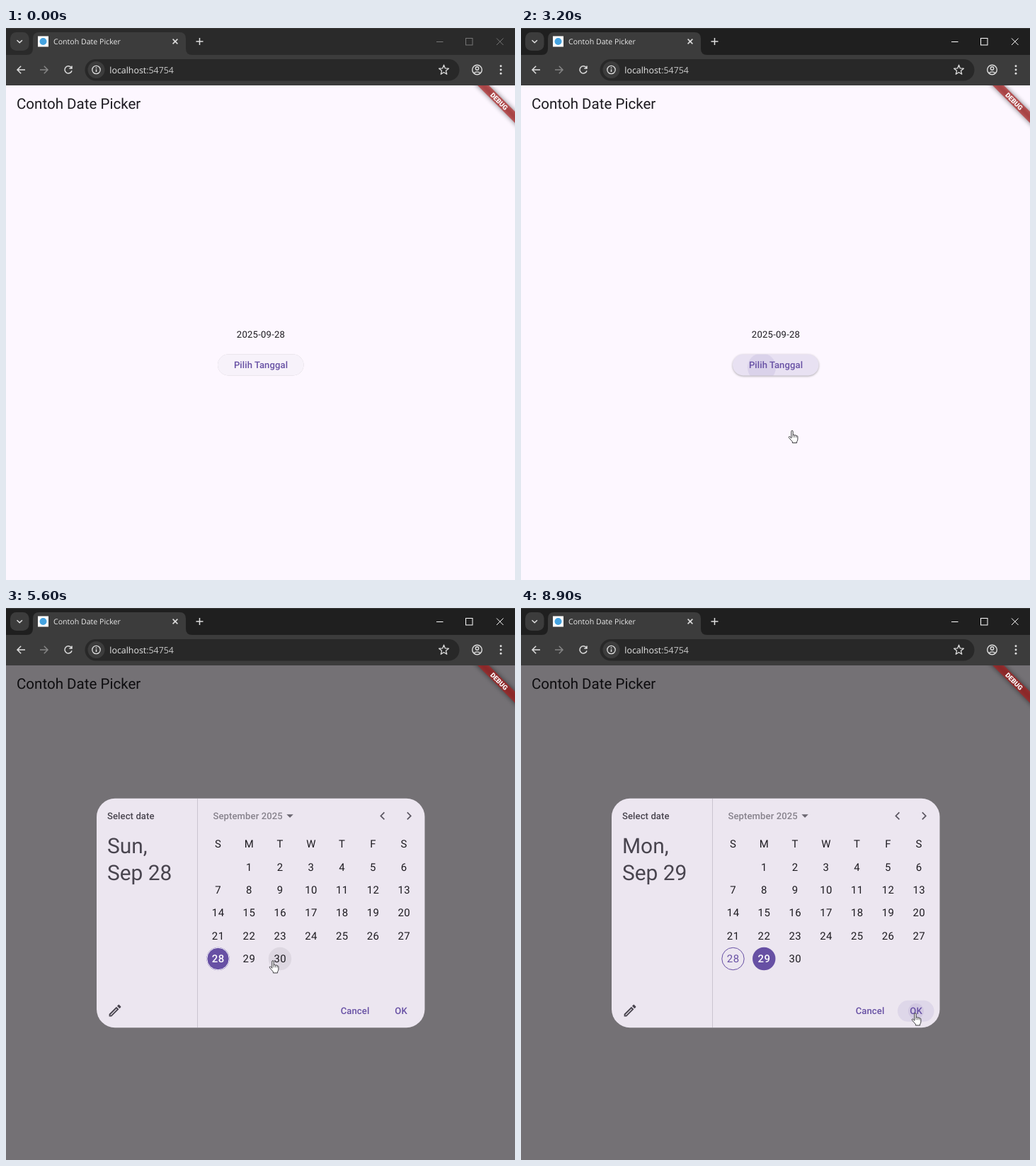
Animation of 719 by 779 pixels, one loop 9000 ms. Source, as an HTML page:

```html
<!DOCTYPE html>
<html lang="id">
<head>
<meta charset="utf-8">
<title>Contoh Date Picker</title>
<style>
  html, body { margin: 0; width: 100%; height: 100%; overflow: hidden; background: #fdf7ff; }
  svg { display: block; width: 719px; height: 779px; }
  text { font-family: Roboto, sans-serif; fill: #1d1b20; text-rendering: geometricPrecision; }
  .ui { font-family: "Open Sans", "Noto Sans", sans-serif; fill: #e8e8e8; }
  .label { font-size: 13.08px; font-weight: 500; letter-spacing: .09px; }
  .primary { fill: #6750a4; }
  .muted { fill: #49454f; }
  .mid { text-anchor: middle; }
  .day { font-size: 14.94px; letter-spacing: .47px; text-anchor: middle; }
  .big { font-size: 29.9px; fill: #49454f; }
  .line { fill: none; stroke: #dedede; stroke-width: 1.5; }
</style>
</head>
<body>
<svg viewBox="0 0 719 779">
  <defs>
    <clipPath id="pageClip"><rect y="81" width="719" height="698"/></clipPath>
    <clipPath id="buttonClip"><rect x="299" y="460.5" width="121.5" height="30" rx="15"/></clipPath>
    <filter id="blur" x="-50%" y="-150%" width="200%" height="400%"><feGaussianBlur stdDeviation="3.5"/></filter>
  </defs>

  <!-- browser window -->
  <rect id="frame" width="719" height="40"/>
  <rect width="719" height="1" fill="#3a3a3a"/>
  <rect x="6" y="6" width="26.5" height="26" rx="8.5" fill="#3c3c3c"/>
  <path class="line" d="M15.5 17.2l3.7 3.6 3.7-3.6"/>
  <path d="M29 38q9 0 9-9V15q0-9 9-9H245q9 0 9 9V29q0 9 9 9Z" fill="#3c3c3c"/>
  <rect y="38" width="719" height="43" fill="#3c3c3c"/>
  <rect x="45" y="11.5" width="15" height="15" fill="#fff"/>
  <circle cx="52.5" cy="19" r="5" fill="#45a3e0"/>
  <text class="ui" x="67" y="23" font-size="10.6">Contoh Date Picker</text>
  <path class="line" d="M235.6 15.6l6.8 6.8m0-6.8l-6.8 6.8M268.5 19h10m-5-5v10"/>
  <g id="controls" fill="none" stroke-width="1">
    <path d="M608 19.5h9.5M693 14.5l9.5 9.5m0-9.5l-9.5 9.5"/>
    <rect x="649.5" y="14.5" width="9.5" height="9.5"/>
  </g>
  <path class="line" d="M27 59H16m5.2-5.2L16 59l5.2 5.2"/>
  <path class="line" d="M48 59h11m-5.2-5.2L59 59l-5.2 5.2" style="stroke:#858585"/>
  <path class="line" d="M92.3 56A5.1 5.1 0 1 0 93 60.2M93 53.4v3.6h-3.7"/>
  <rect x="111.5" y="44" width="529" height="30.5" rx="15.25" fill="#282828"/>
  <circle cx="127.5" cy="59" r="12" fill="#3c3c3c"/>
  <circle class="line" cx="127.5" cy="59" r="5.7" style="stroke-width:1.3"/>
  <path class="line" d="M127.5 58.2v3.8M127.5 55.6v1.4"/>
  <text class="ui" x="146.3" y="63.6" font-size="12.4">localhost<tspan fill="#c8c8c8">:54754</tspan></text>
  <path id="star" class="line" style="stroke-width:1.3" stroke-linejoin="round"/>
  <circle class="line" cx="665.5" cy="59" r="6.8" style="stroke-width:1.4"/>
  <circle class="line" cx="665.5" cy="57" r="2.2" style="stroke-width:1.4"/>
  <path class="line" d="M660.8 63.6q4.7-3.4 9.4 0" style="stroke-width:1.4"/>
  <g fill="#dedede">
    <circle cx="699" cy="53.8" r="1.45"/><circle cx="699" cy="59" r="1.45"/><circle cx="699" cy="64.2" r="1.45"/>
  </g>

  <!-- page -->
  <rect y="81" width="719" height="698" fill="#fdf7ff"/>
  <text x="15" y="114.3" font-size="20.55">Contoh Date Picker</text>
  <text class="mid" x="360" y="437.2" font-size="13.08" letter-spacing=".23">2025-09-28</text>
  <rect id="button" x="299" y="460.5" width="121.5" height="30" rx="15" fill="#f7f2fa"/>
  <g clip-path="url(#buttonClip)" fill="#6750a4">
    <rect id="buttonHover" x="299" y="460" width="122" height="31"/>
    <circle id="buttonRipple" cx="340" cy="479" r="20" opacity=".1"/>
  </g>
  <text class="label primary mid" x="360" y="480.4">Pilih Tanggal</text>

  <!-- dialog -->
  <g id="dialog">
    <rect y="81" width="719" height="698" opacity=".54"/>
    <rect x="128" y="268.8" width="463.5" height="323.4" rx="26" fill="#ece6f0"/>
    <path d="M270.5 269V592" stroke="#cac4d0"/>
    <text class="label muted" x="143" y="297.8">Select date</text>
    <text id="weekday" class="big" x="143" y="346.4"></text>
    <text id="date" class="big" x="143" y="383.8"></text>
    <path class="muted" transform="translate(142.8 557) scale(.934)" d="M14.06 9.02l.92.92L5.92 19H5v-.92l9.06-9.06M17.66 3c-.25 0-.51.1-.7.29l-1.83 1.83 3.75 3.75 1.83-1.83c.39-.39.39-1.02 0-1.41l-2.34-2.34c-.2-.2-.45-.29-.71-.29zm-3.6 3.19L3 17.25V21h3.75L17.81 9.94l-3.75-3.75z"/>
    <g opacity=".62">
      <text class="label muted" x="292.5" y="297.8">September 2025</text>
    </g>
    <path d="M396.4 291.2h9.4l-4.7 4.7z" fill="#6a6670"/>
    <path d="M534.4 288.4l-5 5 5 5M566.8 288.4l5 5-5 5" fill="none" stroke="#5a5661" stroke-width="1.7"/>
    <circle id="dayHover" cy="495" r="16.2" fill="#49454f" opacity=".09"/>
    <circle id="picked" cy="495" fill="#6750a4" r="16.2"/>
    <circle id="today" cx="299.5" cy="495" r="15.7" fill="none"/>
    <g id="days"></g>
    <rect id="okHover" x="532" y="553.8" width="51.5" height="30" rx="15" fill="#6750a4"/>
    <circle id="okRipple" cx="558" cy="569" r="11" fill="#6750a4" opacity=".1"/>
    <text class="label primary mid" x="493" y="573.2">Cancel</text>
    <text class="label primary mid" x="558" y="573.2">OK</text>
  </g>

  <!-- corner banner -->
  <g clip-path="url(#pageClip)">
    <g transform="translate(719 81) rotate(45)">
      <rect x="-60" y="26.1" width="120" height="11.3" opacity=".5" filter="url(#blur)"/>
      <rect x="-60" y="26.1" width="120" height="11.3" fill="#b71c1c" fill-opacity=".627"/>
      <text class="mid" y="35.2" font-size="9.5" font-weight="900" style="fill:#fff">DEBUG</text>
    </g>
  </g>

  <g id="cursor" fill="#fff" stroke="#26262a" stroke-width=".9" stroke-linejoin="round">
    <path id="arrow" d="M0 0V12.2L2.8 9.6 4.9 14 6.7 13.2 4.8 8.9H8.7Z"/>
    <g id="hand" transform="translate(-5.4 .3)">
      <path d="M4.2 11V1.6a1.2 1.2 0 0 1 2.4 0V7q.3-1 1.3-.8 1 .1 1.1 1.1.5-.7 1.4-.5.9.2 1 1 .7-.4 1.3 0 .6.3.6 1.3V12.5q0 2-1.3 3.5V17.7H5.8V16Q3.5 13.5 1 10.5.2 9.3 1.1 8.8 2 8.4 2.9 9.4Z"/>
      <path d="M6.6 7v3M9 7.3v2.7M11.4 7.8v2.4" fill="none" stroke-width=".7"/>
    </g>
  </g>
</svg>
<script>
const LOOP = 9000, STEP = 100;
const $ = id => document.getElementById(id);
const set = (id, name, value) => $(id).setAttribute(name, value);
const show = (id, on) => set(id, 'visibility', on ? 'inherit' : 'hidden');
const within = (t, spans) => spans.some(([a, b]) => t >= a && t < b);
const ramp = (t, a, b) => Math.max(0, Math.min(1, (t - a) / (b - a)));
const colX = i => 299.5 + 43.76 * i;

// time, x, y of the pointer's hot spot
const path = [
  [600, -12, 452], [1000, 313, 511], [1100, 313, 511], [1500, 340, 480],
  [2900, 340, 480], [3200, 383, 567.5], [4300, 383, 567.5], [4400, 385, 560],
  [4500, 384.5, 555.5], [4600, 380, 537], [4900, 377, 497], [5100, 377, 497],
  [5200, 371, 497], [5400, 371, 497], [5600, 377, 497], [5700, 377, 497],
  [6000, 352.5, 496.5], [7200, 352.5, 496.5], [7900, 563, 564],
  [8000, 563, 564], [8400, 557, 571]
];
const handSpans = [[1300, 4600], [4800, 7500], [7800, LOOP]];

function pointer(t) {
  const i = path.findIndex(k => k[0] > t);
  if (i === 0) return path[0].slice(1);
  if (i < 0) return path[path.length - 1].slice(1);
  const [a, b] = [path[i - 1], path[i]];
  const p = ramp(t, a[0], b[0]), e = b[0] - a[0] > 300 ? p * p * (3 - 2 * p) : p;
  return [a[1] + (b[1] - a[1]) * e, a[2] + (b[2] - a[2]) * e];
}

function addDay(label, col, y, id) {
  const el = document.createElementNS('http://www.w3.org/2000/svg', 'text');
  el.setAttribute('class', 'day');
  el.setAttribute('x', colX(col) + .23);
  el.setAttribute('y', y);
  if (id) el.id = id;
  el.textContent = label;
  $('days').append(el);
}

function build() {
  [...'SMTWTFS'].forEach((c, i) => addDay(c, i, 338.2));
  for (let d = 1; d <= 30; d++) addDay(d, d % 7, 370.6 + 32.4 * Math.floor(d / 7), 'day' + d);
  const points = Array.from({ length: 10 }, (_, i) => {
    const r = i % 2 ? 3.1 : 7.2, a = i * Math.PI / 5;
    return (618.5 + r * Math.sin(a)).toFixed(2) + ' ' + (59.4 - r * Math.cos(a)).toFixed(2);
  });
  set('star', 'd', 'M' + points.join('L') + 'Z');
}

function styleDay(day, fill, weight) {
  $('day' + day).style.fill = fill;
  $('day' + day).style.fontWeight = weight;
}

function draw(t) {
  const active = t >= 800, next = t >= 7200;
  set('frame', 'fill', active ? '#1f1f1f' : '#2a2a2a');
  set('controls', 'stroke', active ? '#fff' : '#777');

  const hover = ramp(t, 1200, 1500);
  set('buttonHover', 'opacity', .1 * hover);
  show('buttonRipple', t >= 2100);
  const lift = t >= 4200 ? 0 : hover;
  $('button').style.filter =
    `drop-shadow(0 ${.8 + .7 * lift}px ${.7 + .7 * lift}px rgba(0,0,0,${.24 + .08 * lift}))`;

  show('dialog', t >= 4600);
  $('weekday').textContent = next ? 'Mon,' : 'Sun,';
  $('date').textContent = next ? 'Sep 29' : 'Sep 28';
  set('picked', 'cx', colX(next ? 1 : 0));
  set('today', 'stroke', next ? '#6750a4' : '#fff');
  styleDay(28, next ? '#6750a4' : '#fff', next ? 400 : 500);
  styleDay(29, next ? '#fff' : '#1d1b20', next ? 500 : 400);
  set('dayHover', 'cx', colX(t < 5900 ? 2 : 1));
  show('dayHover', t >= 4900 && !next);
  set('okHover', 'opacity', .1 * ramp(t, 7900, 8100));
  show('okRipple', t >= 8900);

  const hand = within(t, handSpans);
  const [x, y] = pointer(t);
  set('cursor', 'transform', `translate(${x.toFixed(2)} ${y.toFixed(2)})`);
  show('cursor', t >= 600);
  show('arrow', !hand);
  show('hand', hand);
}

build();
const start = performance.now();
function tick() {
  const t = (performance.now() - start) % LOOP;
  draw(Math.floor(t / STEP) * STEP);
  requestAnimationFrame(tick);
}
tick();
</script>
</body>
</html>
```
